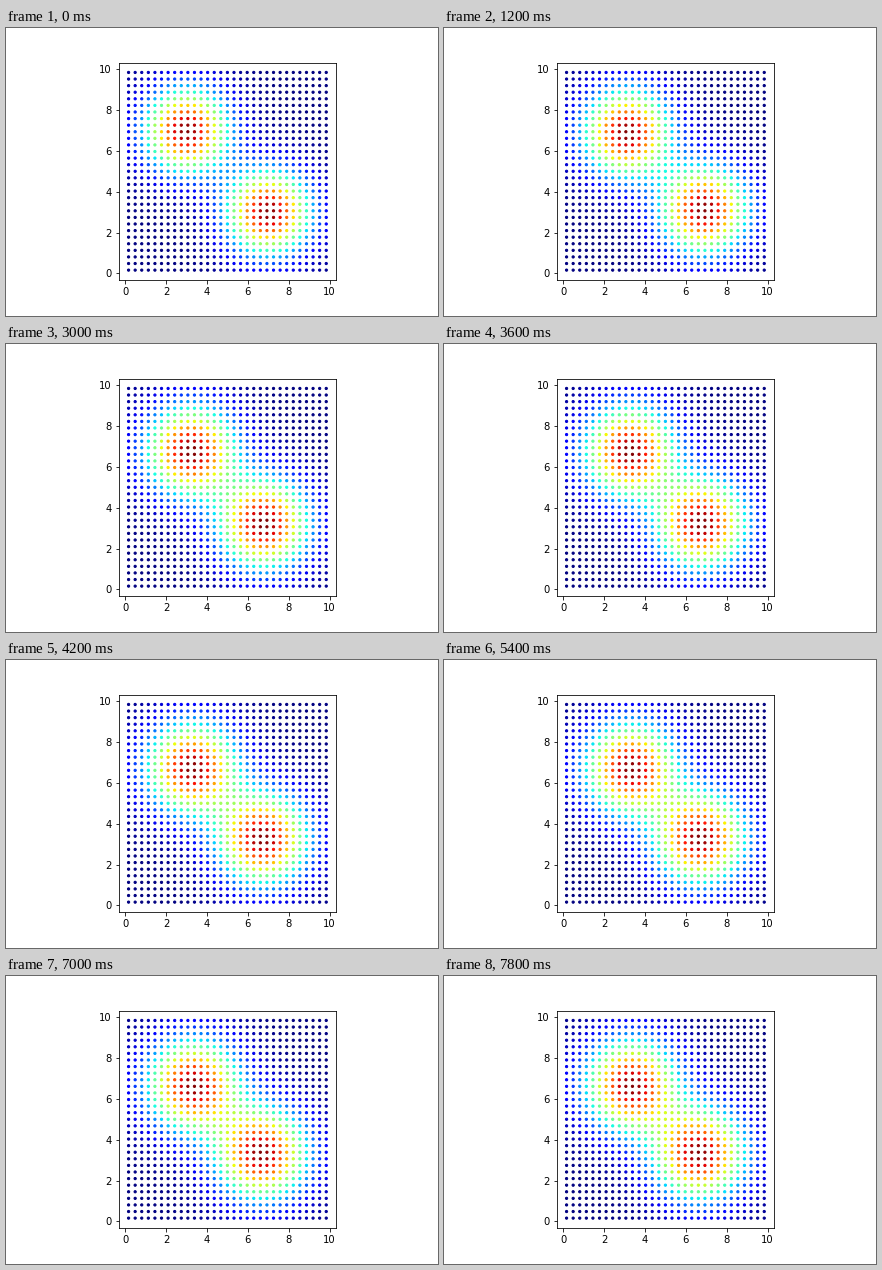
A matplotlib script that plays this animation: 432x288 px, repeating every 8 s.

```python
import numpy as np
import matplotlib.pyplot as plt
from matplotlib.animation import FuncAnimation

FRAMES, INTERVAL = 40, 200
CELLS, SIZE = 31, 10

step = SIZE / CELLS
axis = (np.arange(CELLS) + 0.5) * step
X, Y = (g.ravel() for g in np.meshgrid(axis, axis))


def bump(cx, cy, variance):
    return np.exp(-((X - cx) ** 2 + (Y - cy) ** 2) / (2 * variance))


def density(i):
    """Two hills that drift together and widen, slowing down."""
    progress = 1 - np.exp(-i / 16)
    near, far = 3 + 0.36 * progress, 7 - 0.36 * progress
    variance = 2 + 0.4 * progress
    return bump(near, far, variance) + bump(far, near, variance)


fig, ax = plt.subplots(figsize=(6, 4), dpi=72, facecolor="white")
fig.subplots_adjust(left=0.125, right=0.9, bottom=0.125, top=0.88)
dots = ax.scatter(X, Y, s=5, c=density(0), cmap="jet")
margin = 0.05 * (axis[-1] - axis[0])
limits = (axis[0] - margin, axis[-1] + margin)
ax.set(xlim=limits, ylim=limits, aspect="equal")
ax.set_xticks(range(0, 11, 2))
ax.set_yticks(range(0, 11, 2))


def update(i):
    values = density(i)
    dots.set_array(values)
    dots.set_clim(values.min(), values.max())
    return (dots,)


anim = FuncAnimation(fig, update, frames=FRAMES, interval=INTERVAL,
                     init_func=lambda: update(0), repeat=True, repeat_delay=0)
plt.show()
```
